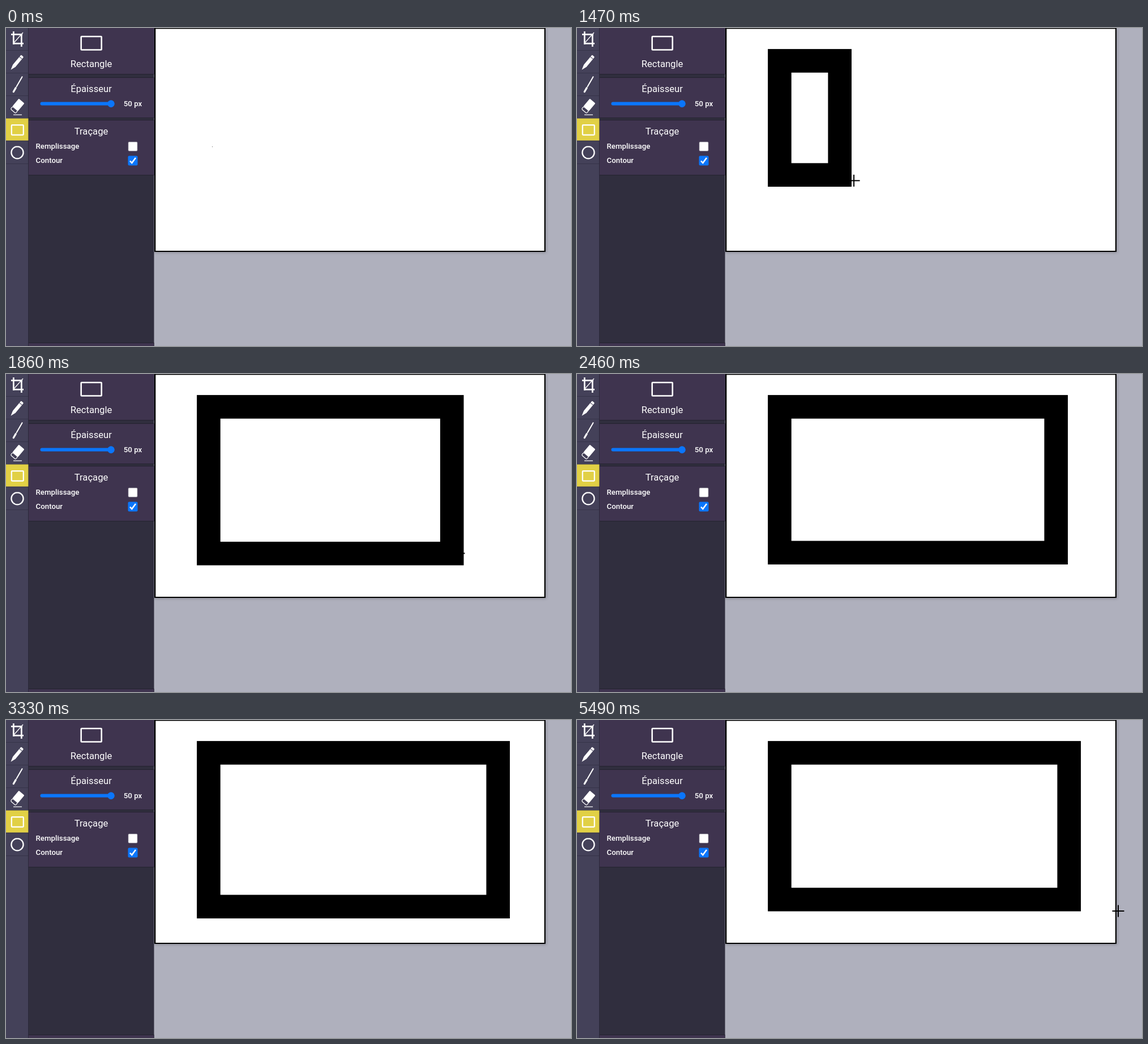
An HTML page with a canvas that plays this animation: 998 px wide and 561 px high, repeating every 5.52 s.

```html
<!DOCTYPE html>
<html lang="fr">
<head>
<meta charset="utf-8">
<title>Outil rectangle</title>
<style>
html, body { margin: 0; width: 100%; height: 100%; overflow: hidden; background: #afb0bd; }
canvas { display: block; width: 100vw; height: 100vh; }
</style>
</head>
<body>
<canvas id="stage" width="998" height="561"></canvas>
<script>
const ctx = document.getElementById('stage').getContext('2d');
const LOOP = 5520, STEP = 30;
const ENTER = 210, PRESS = 990, RELEASE = 3600, LEAVE = 4260, RETURN = 5490;
const STROKE = 41.6, CELL = 40;
const WHITE = '#fff', BLUE = '#0b76fb', BAR = '#444159', PANEL = '#3f344f', DARK = '#302e3e';

const linear = u => u;
const easeOut = u => 1 - (1 - u) ** 2;
const smooth = u => u * u * (3 - 2 * u);
const overshoot = u => Math.sin(0.65 * Math.PI * u) / Math.sin(0.65 * Math.PI);

const origin = { x: 357.9, y: 57.9 };
const entry = { x: 967, y: 227 };

// Pointer moves; it rests between them
const moves = [
  { start: ENTER, end: 930, x: 354, y: 56.5, easeX: easeOut, easeY: easeOut },
  { start: 930, end: PRESS, ...origin },
  { start: PRESS, end: 1440, x: 464.2, y: 259.2, easeX: linear, easeY: easeOut },
  { start: 1440, end: 1830, x: 787.7, y: 316.7, easeX: linear, easeY: overshoot },
  { start: 1830, end: 2100, x: 846.2, y: 315.2, easeX: easeOut, easeY: easeOut },
  { start: 2430, end: 2550, x: 869.2, y: 319.2 },
  { start: 2880, end: 3000, x: 869.2, y: 329.6 },
  { start: 3270, end: 3570, x: 869.2, y: 316.7 },
  { start: 4020, end: LEAVE, x: 1010, y: 291 }
];

function pointerAt(time) {
  let { x, y } = entry;
  for (const { start, end, easeX = smooth, easeY = smooth, ...to } of moves) {
    if (time <= start) break;
    const u = Math.min(1, (time - start) / (end - start));
    x += (to.x - x) * easeX(u);
    y += (to.y - y) * easeY(u);
  }
  return { x, y };
}

function box(color, x, y, w, h, r = 0) {
  ctx.fillStyle = color;
  ctx.beginPath();
  ctx.roundRect(x, y, w, h, r);
  ctx.fill();
}

function outline(x, y, w, h, width, r = 1) {
  ctx.strokeStyle = WHITE;
  ctx.lineWidth = width;
  ctx.beginPath();
  ctx.roundRect(x, y, w, h, r);
  ctx.stroke();
}

function line(width, ...points) {
  ctx.strokeStyle = WHITE;
  ctx.lineWidth = width;
  ctx.beginPath();
  points.forEach(([x, y]) => ctx.lineTo(x, y));
  ctx.stroke();
}

function tilted(x, y, degrees, draw) {
  ctx.save();
  ctx.translate(x, y);
  ctx.rotate(degrees * Math.PI / 180);
  draw();
  ctx.restore();
}

function text(string, x, y, size, weight, align) {
  ctx.font = `${weight} ${size}px Roboto, sans-serif`;
  ctx.textAlign = align;
  ctx.fillStyle = WHITE;
  ctx.fillText(string, x, y);
}

const title = (string, y) => text(string, 150.5, y, 16.64, 400, 'center');
const label = (string, x, y) => text(string, x, y, 13.31, 500, 'left');

function cropIcon() {
  box(WHITE, 9, 10, 20, 2.7);
  box(WHITE, 26, 10, 2.7, 23);
  box(WHITE, 12, 6, 2.7, 23);
  box(WHITE, 12, 26, 19, 2.7);
  line(1.3, [14, 26], [30, 8]);
}

function pencilIcon() {
  tilted(20, 60, -50, () => {
    box(WHITE, -9, -3, 23, 6, 1.5);
    line(2.5, [-8, -2], [-14, 0], [-8, 2]);
    box(BAR, 9, -3, 1, 6);
  });
}

function brushIcon() {
  tilted(20.5, 100, -60, () => {
    box(WHITE, -5, -1, 22, 2, 1);
    box(WHITE, -16, -1.6, 11, 3.2, 1.5);
  });
}

function eraserIcon() {
  tilted(21.5, 136, -50, () => {
    box(WHITE, -8.5, -6.5, 18, 13, 1.5);
    outline(-14, -5.8, 6, 11.6, 1.2, 2);
  });
  box(WHITE, 13, 152.5, 15, 1.2);
}

function circleIcon() {
  outline(9.4, 209.2, 21.2, 21.2, 2.3, 10.6);
}

function drawToolbar() {
  box(BAR, 0, 0, 39, 561);
  for (let row = 1; row <= 6; row++) box('#363449', 0, row * CELL - 1, 39, 1);
  box('#2b293a', 39, 0, 1, 561);
  box('#e1d045', 0, 159.6, 39.4, 39);
  cropIcon();
  pencilIcon();
  brushIcon();
  eraserIcon();
  outline(9.8, 171.2, 21, 17.4, 2.2);
  circleIcon();
}

function panel(y, h) {
  box('#24222f', 40, y - 1, 221.5, h + 2);
  box(PANEL, 40, y, 221.5, h);
}

function checkbox(y, checked) {
  box(checked ? BLUE : '#777382', 215.5, y, 17, 17, 2);
  if (checked) line(2.5, [219, y + 9], [222.3, y + 12.5], [229, y + 3.5]);
  else box(WHITE, 216.3, y + 0.8, 15.4, 15.4, 1.4);
}

function drawOptions() {
  box(DARK, 40, 0, 221.5, 561);
  panel(0, 81);
  panel(88, 70);
  panel(163, 96);
  panel(556, 6);

  outline(132.7, 15, 36, 23.5, 2.6);
  title('Rectangle', 69);
  title('Épaisseur', 113);
  title('Traçage', 188);

  box(BLUE, 60.5, 130.6, 130, 6, 3);
  box(BLUE, 179.2, 127.3, 12.6, 12.6, 6.3);
  label('50 px', 207.7, 138);
  label('Remplissage', 52.5, 213.3);
  label('Contour', 52.5, 238.3);
  checkbox(200.5, false);
  checkbox(225.5, true);
}

function drawSheet() {
  ctx.save();
  ctx.shadowColor = 'rgba(0,0,0,.25)';
  ctx.shadowBlur = 5;
  ctx.shadowOffsetX = ctx.shadowOffsetY = 1;
  box('#000', 262, 0, 691, 395);
  ctx.restore();
  box(WHITE, 264.3, 1.6, 686.5, 391.4);
  box('#555', 364, 209, 1, 1);
}

// The outline trails the pointer by one step
function drawRectangle(time) {
  const corner = pointerAt(Math.min(time, RELEASE) - STEP);
  ctx.strokeStyle = '#000';
  ctx.lineWidth = STROKE;
  ctx.strokeRect(origin.x, origin.y, corner.x - origin.x, corner.y - origin.y);
}

function drawPointer({ x, y }) {
  box('#000', x - 10.5, y - 1, 21, 2);
  box('#000', x - 1, y - 10.5, 2, 21);
}

function render(time) {
  box('#afb0bd', 0, 0, 998, 561);
  drawSheet();
  drawOptions();
  drawToolbar();
  if (time > PRESS) drawRectangle(time);
  if (time >= ENTER && time < LEAVE) drawPointer(pointerAt(time));
  if (time >= RETURN) drawPointer({ x: 956, y: 337 });
}

const start = performance.now();
function tick() {
  const elapsed = (performance.now() - start) % LOOP;
  render(Math.floor(elapsed / STEP) * STEP);
  requestAnimationFrame(tick);
}
tick();
</script>
</body>
</html>
```
